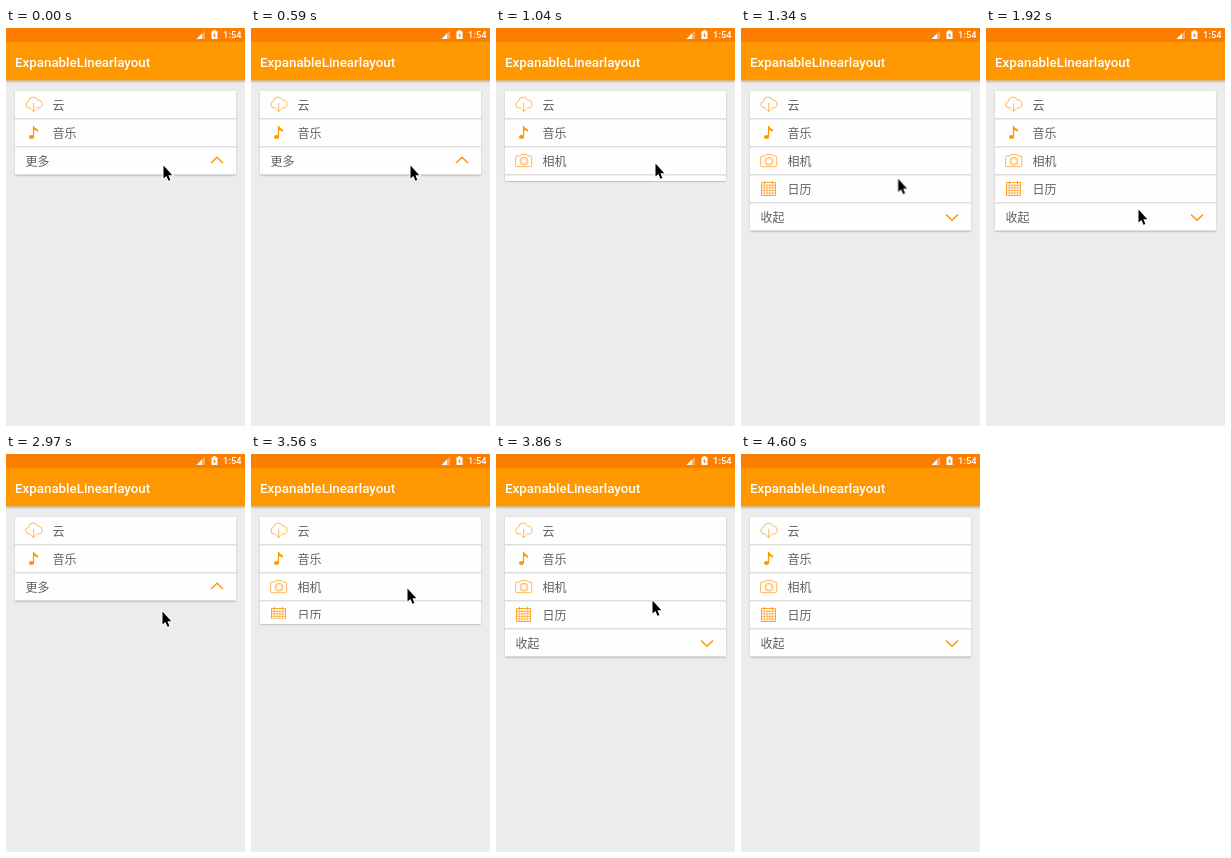
Recreate the animation shown at these times as an HTML page. Size 239x398 px, loop 4890 ms.

```html
<!DOCTYPE html>
<html lang="zh-CN">
<head>
<meta charset="utf-8">
<title>ExpanableLinearlayout</title>
<style>
  html, body { margin: 0; width: 100%; height: 100%; overflow: hidden; background: #ececec; }
  body { position: relative; }
  body > *, .row, .row svg { position: absolute; }

  .status { width: 239px; height: 14px; background: #fb7e00; z-index: 1; }
  .bar {
    top: 14px; width: 230px; height: 38px; padding-left: 9px;
    background: #ff9800; box-shadow: 0 1px #d9b27c, 0 2px 2px rgba(0, 0, 0, .2);
    color: #fff; font: 500 13.33px/41px Roboto, sans-serif; white-space: nowrap;
  }
  .status text { font: 500 9.33px Roboto, sans-serif; fill: #fff; }

  .card {
    left: 9px; top: 63px; width: 221px; height: 84px; box-sizing: border-box;
    border: 0 solid #fefefe; border-radius: 1px; overflow: hidden;
    background: #fefefe; box-shadow: 0 .5px 1.5px rgba(0, 0, 0, .3);
    animation: resize 4890ms step-end infinite;
  }
  .row {
    top: calc(var(--i) * 28px); left: 0; width: 221px; height: 28px;
    box-sizing: border-box; padding-left: 37.5px;
    background: #fefefe; box-shadow: inset 0 1px #ececec, inset 0 -1px #dedede;
    color: #606060; font: 12px/27px "Noto Sans CJK SC", "Noto Sans CJK", sans-serif;
  }
  .row:first-child { box-shadow: inset 0 -1px #dedede; }
  .row svg { left: 10px; top: 0; width: 18px; height: 28px; fill: none; stroke: #ffa52a; stroke-width: .8; }
  .row .solid { fill: #ff9800; stroke: none; }
  .toggle { padding-left: 10.5px; }
  .row.toggle svg { left: 193px; stroke: #ff9800; stroke-width: 1.5; }
  .more { animation: more 4890ms step-end infinite; }

  .cursor { left: 0; top: 0; z-index: 2; overflow: visible; animation: pointer 4890ms step-end infinite; }

  /* The border trims the rows a little above the moving edge. */
  @keyframes resize {
    0% { height: 84px; border-bottom-width: 0; }
    21.26% { height: 90px; border-bottom-width: 5px; }
    24.33% { height: 129px; border-bottom-width: 5px; }
    27.4% { height: 140px; border-bottom-width: 0; }
    51.53% { height: 112px; border-bottom-width: 5px; }
    54.6% { height: 84px; border-bottom-width: 0; }
    72.8% { height: 107px; border-bottom-width: 5px; }
    75.86% { height: 139px; border-bottom-width: 5px; }
    78.93%, 100% { height: 140px; border-bottom-width: 0; }
  }
  @keyframes more {
    0%, 54.6% { visibility: visible; }
    21.26%, 72.8%, 100% { visibility: hidden; }
  }
  @keyframes pointer {
    0% { transform: translate(156px, 136px); }
    8.99% { transform: translate(157px, 136px); }
    12.06% { transform: translate(158px, 136px); }
    21.26% { transform: translate(158px, 134px); animation-timing-function: steps(6); }
    39.26% { transform: translate(151px, 180px); }
    45.39% { transform: translate(150px, 180px); animation-timing-function: steps(2); }
    51.53% { transform: translate(148px, 180px); animation-timing-function: steps(3); }
    60.73% { transform: translate(155px, 156px); animation-timing-function: steps(2); }
    66.66% { transform: translate(155px, 135px); }
    69.73% { transform: translate(155px, 133px); }
    75.86% { transform: translate(155px, 136px); }
    78.93% { transform: translate(155px, 145px); }
    82% { transform: translate(156px, 168px); }
    85.07% { transform: translate(159px, 215px); }
    87.93% { transform: translate(164px, 300px); }
    91% { transform: translate(170px, 391px); }
    94.06%, 100% { transform: translate(170px, 420px); }
  }
</style>
</head>
<body>
  <svg class="status" viewBox="0 0 239 14">
    <path d="M190.500 11L199 2.500V11z" fill="#fff" opacity=".35"/>
    <path d="M190.500 11l5.500-5.500v5.500z" fill="#fff"/>
    <path d="M205.500 3.200h1.800V2h2.400v1.200h1.800V11h-6z" fill="#fff"/>
    <path d="M208.800 4.500l-1.800 3h1.300V10l1.800-3h-1.300z" fill="#fb7e00"/>
    <text x="235.500" y="10" text-anchor="end">1:54</text>
  </svg>
  <div class="bar">ExpanableLinearlayout</div>

  <div class="card">
    <div class="row" style="--i:0">
      <svg><path d="M6 17H4A3.400 3.400 0 0 1 3.500 10.300A4.700 4.700 0 0 1 12.600 9.200A3.900 3.900 0 0 1 13.600 17H11.500M8.700 12V20.500M6.300 18.200l2.400 2.400 2.400-2.400"/></svg>云
    </div>
    <div class="row" style="--i:1">
      <svg><g class="solid"><ellipse cx="6.500" cy="18" rx="2.600" ry="2"/><path d="M7.900 7h1.200q.3 2 3 3 1.800 1 .9 3-1.300-1.600-3.900-1.700V18H7.900z"/></g></svg>音乐
    </div>
    <div class="row" style="--i:2">
      <svg><path d="M2 9H5L6.200 7.500H11.800L13 9H15.500Q16.700 9 16.700 10.200V18.500Q16.700 19.700 15.500 19.700H2Q.6 19.700 .6 18.500V10.200Q.6 9 2 9z"/><circle cx="9" cy="14.200" r="4"/><circle cx="9" cy="14.200" r="2.700" stroke-width=".4"/></svg>相机
    </div>
    <div class="row" style="--i:3">
      <svg><path d="M1.500 7.500h14v13h-14zM1.500 10.200h14M4.500 6v3M12.500 6v3" stroke-width="1"/><path d="M2 12.800h13M2 15.400h13M2 18h13M4.300 10.500v10M7.100 10.500v10M9.900 10.500v10M12.700 10.500v10" stroke-width=".7"/></svg>日历
    </div>
    <div class="row toggle" style="--i:4">收起<svg><path d="M3 11.500l6 5.700 6-5.700"/></svg></div>
    <div class="row toggle more" style="--i:2">更多<svg><path d="M3 16l6-5.700 6 5.700"/></svg></div>
  </div>

  <svg class="cursor" width="14" height="20">
    <path d="M1.500 1.500V14.500L4.400 11.900L6.500 16.700L8.400 15.900L6.400 11.200H10.300z" fill="#000" stroke="#fff" stroke-width="2" paint-order="stroke"/>
  </svg>
</body>
</html>
```
